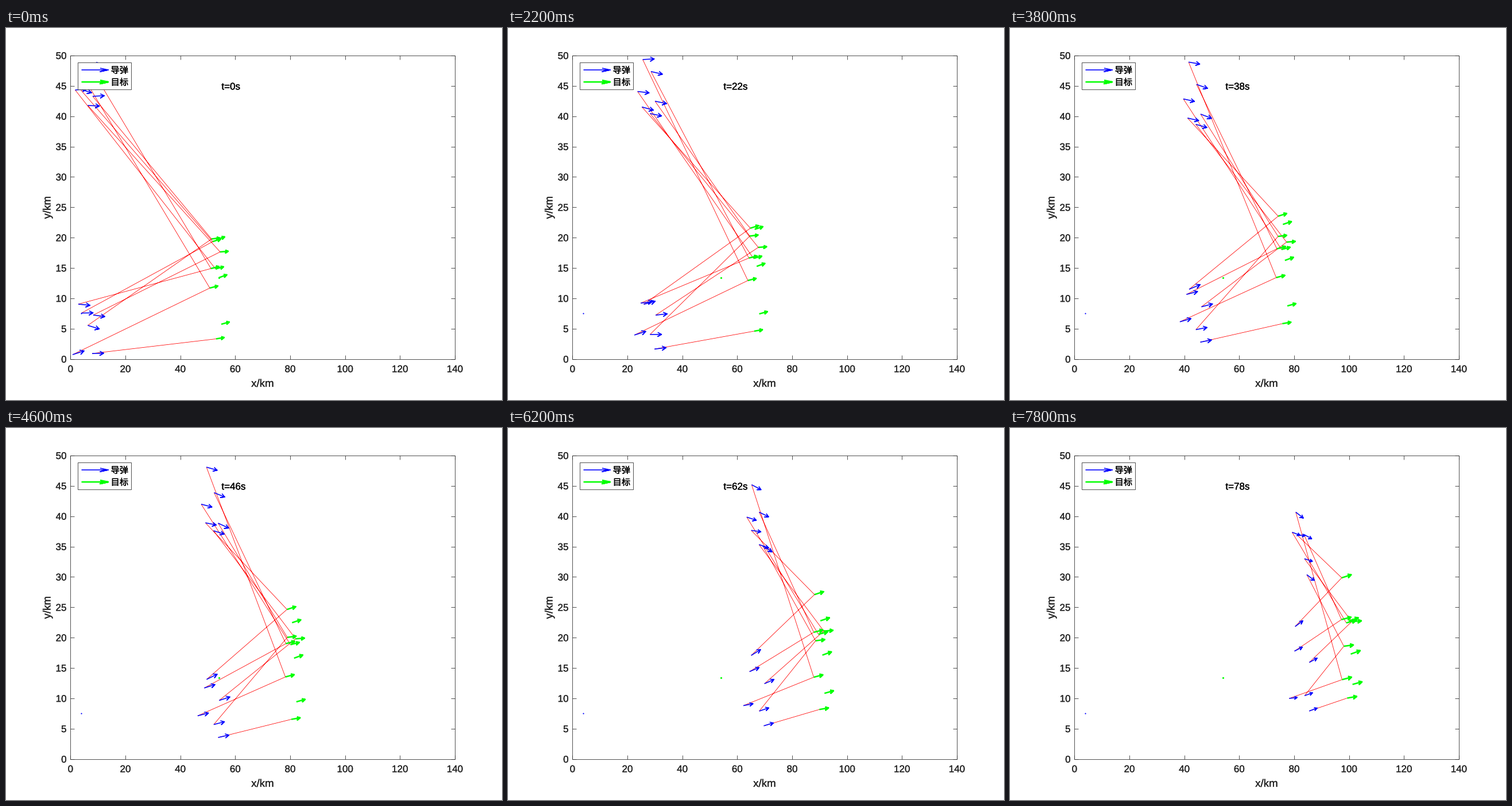
Write a matplotlib script that moves like this. It is 864x648 px and loops after 8000 ms.

```python
import numpy as np
import matplotlib.pyplot as plt
from matplotlib.animation import FuncAnimation
from matplotlib.patches import Rectangle
from matplotlib.patheffects import withStroke

W, H = 864, 648
LEFT, RIGHT, TOP, BOTTOM = 112.32, 781.92, 47.9, 576.72
KX, KY = (RIGHT - LEFT) / 140, (BOTTOM - TOP) / 50  # pixels per km
STEP, FRAMES = 2, 40  # seconds of flight per frame
SUB = 4  # integration steps per second
INK, RED, BLUE, GREEN = "#262626", "#ff0000", "#0000ff", "#00ff00"

# Targets hold a steady turn: x km, y km, heading rad, turn mrad/s
TARGETS = np.array([
    (51.78, 19.35, .145, 2.1), (53.25, 19.69, .151, -2.2),
    (54.50, 17.65, .037, 1.8), (51.37, 19.78, .060, -2.2),
    (51.16, 14.91, .115, 1.5), (52.83, 14.85, .120, 1.1),
    (54.02, 13.40, .165, -2.1), (50.74, 11.70, .119, -2.3),
    (54.92, 5.74, .125, 0.4), (53.04, 3.33, .078, 1.7),
])

# Missiles chase by proportional navigation: x km, y km, heading rad, target
MISSILES = np.array([
    (3.70, 47.20, .168, 7), (6.62, 48.57, -.002, 4), (1.71, 44.32, .034, 5),
    (3.49, 44.46, -.142, 0), (8.09, 43.28, .024, 3), (6.31, 41.77, -.021, 2),
    (4.01, 7.58, .008, 0), (2.86, 9.05, -.046, 4), (8.30, 7.25, -.057, 2),
    (6.31, 5.55, -.139, 3), (0.77, 0.73, .147, 7), (7.88, 0.92, .011, 9),
])
AIM = MISSILES[:, 3].astype(int)
MISSILE_SPEED, TARGET_SPEED = 1.0, 0.6  # km/s
GAIN, MAX_TURN = 1.6, 0.0065


def velocity(speed, heading):
    return speed * np.column_stack([np.cos(heading), np.sin(heading)])


def fly():
    """Positions and missile headings at every frame."""
    m, mh = MISSILES[:, :2].copy(), MISSILES[:, 2].copy()
    t, th = TARGETS[:, :2].copy(), TARGETS[:, 2].copy()
    dt = 1 / SUB
    states = []
    for n in range(FRAMES * STEP * SUB):
        if n % (STEP * SUB) == 0:
            states.append((m.copy(), mh.copy(), t.copy()))
        mv, tv = velocity(MISSILE_SPEED, mh), velocity(TARGET_SPEED, th)
        r, v = t[AIM] - m, (tv[AIM] - mv)
        sight_rate = (r[:, 0] * v[:, 1] - r[:, 1] * v[:, 0]) / (r ** 2).sum(axis=1)
        m += mv * dt
        t += tv * dt
        mh += np.clip(GAIN * sight_rate, -MAX_TURN, MAX_TURN) * dt
        th += TARGETS[:, 3] / 1000 * dt
    return states


STATES = fly()


def to_screen(p):
    return np.column_stack([LEFT + p[:, 0] * KX, BOTTOM - p[:, 1] * KY])


def arrow(tail, vec, back, half):
    """Open arrow as one polyline, ended by a gap."""
    u = vec / np.hypot(*vec)
    side = np.array([-u[1], u[0]]) * half
    tip = tail + vec
    base = tip - back * u
    return [tail, tip, base + side, tip, base - side, (np.nan, np.nan)]


def field(pos, heading, scale):
    """Arrows whose common length follows the spread of the points."""
    length = scale * np.hypot(*(np.ptp(pos, axis=0) / np.sqrt(len(pos))))
    points = []
    for tail, vec in zip(to_screen(pos), velocity(length, heading) * (KX, -KY)):
        size = np.hypot(*vec)
        points += arrow(tail, vec, 0.33 * size, 0.18 * size)
    return np.array(points).T


plt.rcParams["font.family"] = "Liberation Sans"
plt.rcParams["lines.solid_capstyle"] = "butt"
fig = plt.figure(figsize=(W / 72, H / 72), dpi=72, facecolor="white")
ax = fig.add_axes([0, 0, 1, 1])
ax.set_xlim(0, W)
ax.set_ylim(H, 0)
ax.axis("off")


def line(x, y, color, width, z, **kw):
    return ax.plot(x, y, color=color, lw=width, zorder=z, **kw)[0]


def label(x, y, text, size, color=INK, **kw):
    return ax.text(x, y, text, fontsize=size, color=color, zorder=8, va="baseline",
                   path_effects=[withStroke(linewidth=0.3, foreground=color)], **kw)


def box(x, y, w, h, fill, z):
    ax.add_patch(Rectangle((x, y), w, h, fc=fill, ec=INK, lw=0.8, zorder=z, snap=True))


# Axes
box(LEFT, TOP, RIGHT - LEFT, BOTTOM - TOP, "none", 1)
TICK = 6.7
for v in range(0, 141, 20):
    x = LEFT + v * KX
    for y, d in ((BOTTOM, -TICK), (TOP, TICK)):
        line([x, x], [y, y + d], INK, 0.8, 1)
    label(x, 599.5, str(v), 17, ha="center")
for v in range(0, 51, 5):
    y = BOTTOM - v * KY
    for x, d in ((LEFT, TICK), (RIGHT, -TICK)):
        line([x, x + d], [y, y], INK, 0.8, 1)
    label(105.5, y + 6.1, str(v), 17, ha="right")
label(447, 625, "x/km", 18.7, ha="center")
label(77.5, 312.6, "y/km", 18.7, ha="center", rotation=90, rotation_mode="anchor")

# Legend
box(125, 60, 93.2, 46.5, "white", 6)
for y, name, color, width in ((73, "导弹", BLUE, 1.6), (94, "目标", GREEN, 2.5)):
    shape = arrow(np.array([131.5, y]), np.array([46.5, 0]), 14, 3)
    line(*np.array(shape).T, color, width, 7)
    label(182.5, y + 5.7, name, 15.3, "black", family="Noto Sans CJK JP")

# Dots left at two starting points
for start, color, size in ((MISSILES[6:7], BLUE, 2.2), (TARGETS[6:7], GREEN, 3.2)):
    line(*to_screen(start).T, color, 0, 3, marker="o", ms=size, mew=0)

links = line([], [], RED, 0.8, 2)
missiles = line([], [], BLUE, 1.6, 4)
targets = line([], [], GREEN, 2.5, 4)
clock = label(LEFT + 55 * KX, 107.3, "", 17, "black")


def update(i):
    m, heading, t = STATES[i]
    gap = np.full((len(m), 2), np.nan)
    ends = np.stack([to_screen(m), to_screen(t[AIM]), gap], axis=1)
    links.set_data(*ends.reshape(-1, 2).T)
    missiles.set_data(*field(m, heading, 0.3))
    # target arrows keep their first heading
    targets.set_data(*field(t, TARGETS[:, 2], 0.54))
    clock.set_text(f"t={i * STEP}s")
    return links, missiles, targets, clock


anim = FuncAnimation(fig, update, frames=FRAMES, interval=200, repeat=True,
                     repeat_delay=0, blit=False)
plt.show()
```
